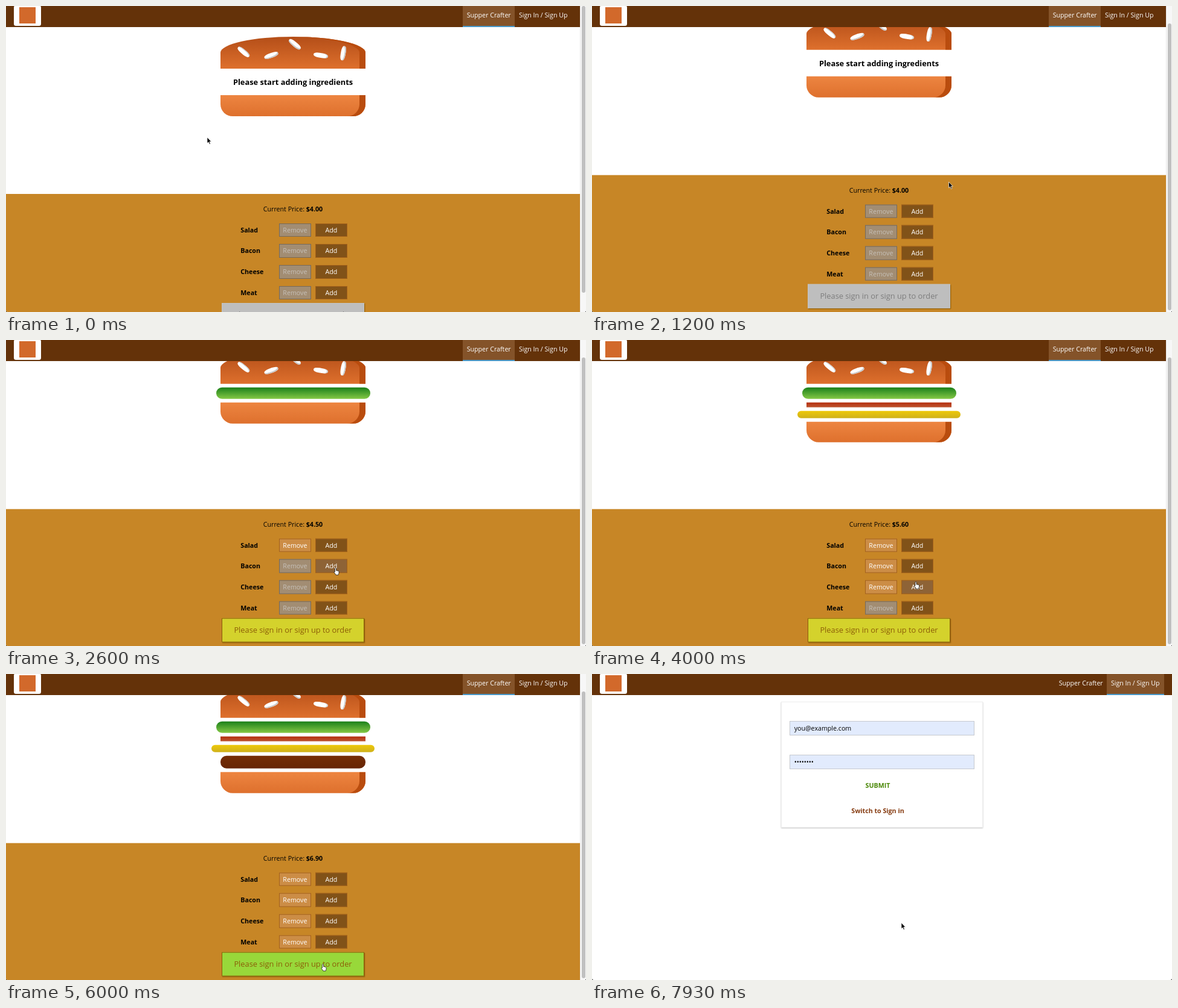
Recreate the animation shown at these times as an HTML page. Size 960 by 508 pixels, loop 8000 ms.

```html
<!DOCTYPE html>
<html lang="en">
<head>
<meta charset="utf-8">
<title>Supper Crafter</title>
<style>
html, body { margin: 0; width: 100%; height: 100%; overflow: hidden; background: #222; }
* { box-sizing: border-box; }
#stage { position: relative; width: 960px; height: 508px; overflow: hidden; background: #fff;
  border-radius: 0 0 3px 3px; font: 10.667px/20px "Open Sans", sans-serif; color: #000; }
#stage div, .text, svg { position: absolute; white-space: nowrap; }
.text { height: 20px; margin-top: -10px; }
.center { text-align: center; }

#nav { left: 0; top: 0; width: 960px; height: 34.5px; background: #643209; color: #fff; }
#tile { left: 13.3px; top: -.6px; width: 44.7px; height: 33.4px; border-radius: 3.5px; background: #fff; }
#mark { left: 9px; top: 3px; width: 27px; height: 27px; background: #d2692b; }
.link { top: -3px; height: 37.5px; line-height: 36.6px; text-align: center; }
.link.active { background: #845329; border-bottom: 2.7px solid #4798c9; }

#shop { left: 0; top: 0; width: 950px; height: 540px; }
#panel { left: 0; top: 312px; width: 950px; height: 228px; background: #c78626; }
#burger { left: 325px; top: 51.3px; width: 300px; height: 265px; }
#burger > .layer { position: relative; margin: 6px auto; width: 240px; }
#burger > .bunTop { height: 53.1px; margin-top: 0; background: linear-gradient(#b44e18, #de702d);
  border-radius: 50% 50% 0 0; box-shadow: inset -10px 0 #b94c0e; }
#burger > .bunBottom { height: 34.6px; background: linear-gradient(#ed8541, #de702d);
  border-radius: 0 0 20px 20px; box-shadow: inset -10px 0 #b94c0e; }
#burger > .salad { width: 255px; height: 18.6px; background: linear-gradient(#1b801a, #84c845); border-radius: 13.3px; }
#burger > .bacon { height: 8px; background: linear-gradient(#b63010, #bd5430); }
#burger > .cheese { width: 270px; height: 11.9px; background: linear-gradient(#eec90a, #cfb11a); border-radius: 13.3px; }
#burger > .meat { height: 21.2px; background: linear-gradient(#752d06, #662503); border-radius: 10px; }
#burger > .hint { margin: 12.8px 0; text-align: center; font: bold 12.8px/18px "Open Sans", sans-serif; }

.seed, .seed::before, .seed::after { position: absolute; background: #fff; border-radius: 40%; }
.seed { width: 10%; height: 15%; top: 50%; }
.seed::before, .seed::after { width: 100%; height: 100%; }
.one { left: 30%; transform: rotate(-20deg); box-shadow: inset -1.3px -2px #c9c9c9; }
.one::after { content: ""; left: -170%; top: -260%; transform: rotate(60deg); box-shadow: inset -.7px 1.3px #c9c9c9; }
.one::before { content: ""; left: 180%; top: -50%; transform: rotate(60deg); box-shadow: inset -.7px -2px #c9c9c9; }
.two { left: 64%; transform: rotate(10deg); box-shadow: inset -2px 0 #c9c9c9; }
.two::before { content: ""; left: 150%; top: -130%; transform: rotate(90deg); box-shadow: inset .7px 2px #c9c9c9; }

.button { height: 22.6px; width: 53.4px; line-height: 20.6px; text-align: center; color: #fff; border: 1px solid #a2601a; }
.remove { left: 451.7px; background: #cc8d46; }
.remove.disabled { background: #a28d73; border-color: #75695b; color: #c6c0b8; }
.add { left: 511.7px; background: #815218; }
.add.hover { background: #8e6336; }
#order { left: 356.7px; top: 493.4px; width: 236.6px; height: 39.4px; border: 1px solid #8c5d08; color: #8c5d08;
  background: #d4d22c; box-shadow: 1.3px 1.3px 1.3px #8c5d08; font-size: 12.8px; line-height: 37.4px; }
#order.hover { background: #98d83a; }
#order.disabled { background: #bebebe; border-color: #c4c4c4; color: #7d7d7d; }

#scrollbar { left: 950px; top: 0; width: 10px; height: 508px; background: #f7f7f7; border-left: 1px solid #e8e8e8; }
#thumb { left: 1.5px; width: 6px; height: 476.5px; border-radius: 3px; background: #c0c0c0; }

#card { left: 313.3px; top: 45.5px; width: 333.4px; height: 209px; border: 1px solid #eee; box-shadow: 0 1.3px 2px #c4c4c4; }
.field { left: 327px; width: 306px; height: 24px; padding-left: 6.7px; line-height: 22px; background: #e2ebfd; border: 1px solid #c6c9cf; }
</style>
</head>
<body>
<div id="stage">
  <div id="shop">
    <div id="burger"></div>
    <div id="panel"></div>
    <span class="text center" style="top:336.7px;left:0;width:950px">Current Price: <b id="price"></b></span>
    <div id="controls"></div>
    <div id="order" class="button">Please sign in or sign up to order</div>
  </div>
  <div id="auth">
    <div id="card"></div>
    <div class="field" style="top:78px">you@example.com</div>
    <div class="field" style="top:134px">••••••••</div>
    <b class="text center" style="top:185px;left:423px;width:100px;color:#4a8807">SUBMIT</b>
    <b class="text center" style="top:226.5px;left:413px;width:120px;color:#853a0f">Switch to Sign in</b>
  </div>
  <div id="nav">
    <div id="tile"><div id="mark"></div></div>
    <div id="links">
      <div class="link" style="left:-103.3px;width:95px">Sign In / Sign Up</div>
      <div class="link" style="left:-188.6px;width:85.6px">Supper Crafter</div>
    </div>
  </div>
  <div id="scrollbar"><div id="thumb"></div></div>
  <svg id="cursor" width="14" height="18" style="overflow:visible">
    <path id="arrow" d="M0 0V9.9L2.2 7.9L3.8 11.5L5.4 10.8L3.8 7.3H6.8Z" fill="#000" stroke="#fff" stroke-width=".7"/>
    <path id="hand" transform="translate(-3 -.5)" fill="#fff" stroke="#000" stroke-width=".7"
      d="M3 .5C3.8 .5 4.1 1.1 4.1 1.7V5C4.4 4.5 5.4 4.6 5.6 5.2C6 4.8 6.9 5 7.1 5.6C7.7 5.3 8.5 5.7 8.5 6.5V9C8.5 10.3 7.6 10.7 7.6 12H3.4C3 10.7 1.5 9.5 .7 7.7C.3 6.9 1.2 6.3 1.9 7V1.7C1.9 1 2.3 .5 3 .5Z"/>
  </svg>
</div>
<script>
const LOOP = 8000, SCROLL = 31.3, SIGN_UP_AT = 6040;
const $ = id => document.getElementById(id);

const ingredients = [
  { name: 'Salad', cost: 0.5, addedAt: 2000 },
  { name: 'Bacon', cost: 0.7, addedAt: 2870 },
  { name: 'Cheese', cost: 0.4, addedAt: 3600 },
  { name: 'Meat', cost: 1.3, addedAt: 4730 }
];

// time, x, y of the pointer tip
const path = [
  [0, 333, 218], [150, 333, 218], [1200, 590.5, 292], [1700, 546, 337], [2200, 545, 338],
  [2600, 545.5, 378.5], [3050, 545, 379], [3450, 538, 403], [4000, 536, 401.5],
  [4500, 538, 438], [5000, 537, 439], [5650, 525, 481], [6040, 524.5, 481.5],
  [6930, 521, 478.5], [7930, 512, 413], [8000, 512, 413]
];

const ease = u => u * u * (3 - 2 * u);
const clamp = u => Math.max(0, Math.min(1, u));

function pointerAt(t) {
  const i = path.findIndex(p => p[0] > t);
  const [t0, x0, y0] = path[i - 1], [t1, x1, y1] = path[i];
  const u = ease((t - t0) / (t1 - t0));
  return [x0 + (x1 - x0) * u, y0 + (y1 - y0) * u];
}

ingredients.forEach((item, i) => {
  const y = 372 + i * 34.67;
  item.top = y - 11.2;
  $('controls').insertAdjacentHTML('beforeend',
    `<b class="text" style="left:388.3px;top:${y - 0.2}px">${item.name}</b>
     <div class="button remove" style="top:${item.top}px">Remove</div>
     <div class="button add" style="top:${item.top}px">Add</div>`);
});
const removeButtons = document.querySelectorAll('.remove');
const addButtons = document.querySelectorAll('.add');
const links = document.querySelectorAll('.link');

const layer = (kind, content = '') => `<div class="layer ${kind}">${content}</div>`;
const seeds = '<div class="seed one"></div><div class="seed two"></div>';
let stackSize = -1;

function showStack(added) {
  if (added.length === stackSize) return;
  stackSize = added.length;
  const filling = added.map(item => layer(item.name.toLowerCase())).join('');
  $('burger').innerHTML = layer('bunTop', seeds)
    + (filling || '<p class="hint">Please start adding ingredients</p>')
    + layer('bunBottom');
  const total = added.reduce((sum, item) => sum + item.cost, 4);
  $('price').textContent = '$' + total.toFixed(2);
}

function render(t) {
  const shopping = t < SIGN_UP_AT;
  const scrolled = ease(clamp((t - 350) / 400));
  const scroll = scrolled * SCROLL;
  const [x, y] = pointerAt(t);
  const over = (left, top, width, height) => shopping
    && x >= left && x <= left + width && y + scroll >= top && y + scroll <= top + height;

  $('shop').style.display = $('scrollbar').style.display = shopping ? '' : 'none';
  $('auth').style.display = shopping ? 'none' : '';
  $('links').style.left = (shopping ? 950 : 960) - 5 + 'px';
  $('links').style.marginLeft = '-5px';
  links[0].classList.toggle('active', !shopping);
  links[1].classList.toggle('active', shopping);
  $('links').style.marginLeft = shopping ? '0' : '0';
  $('links').style.left = shopping ? '945px' : '955px';
  $('shop').style.transform = `translateY(${-scroll}px)`;
  $('thumb').style.top = -0.5 + 29 * scrolled + 'px';

  const added = ingredients.filter(item => t >= item.addedAt);
  showStack(added);
  let pressing = false;
  ingredients.forEach((item, i) => {
    const hover = over(511.7, item.top, 53.4, 22.6);
    removeButtons[i].classList.toggle('disabled', t < item.addedAt);
    addButtons[i].classList.toggle('hover', hover);
    pressing = pressing || hover;
  });
  const ordering = added.length > 0 && over(356.7, 493.4, 236.6, 39.4);
  $('order').classList.toggle('disabled', !added.length);
  $('order').classList.toggle('hover', ordering);
  pressing = pressing || ordering;

  $('cursor').style.transform = `translate(${x}px, ${y}px)`;
  $('cursor').style.left = $('cursor').style.top = 0;
  $('hand').style.display = pressing ? '' : 'none';
  $('arrow').style.display = pressing ? 'none' : '';
}

function frame() {
  render(performance.now() % LOOP);
  requestAnimationFrame(frame);
}
frame();
</script>
</body>
</html>
```
